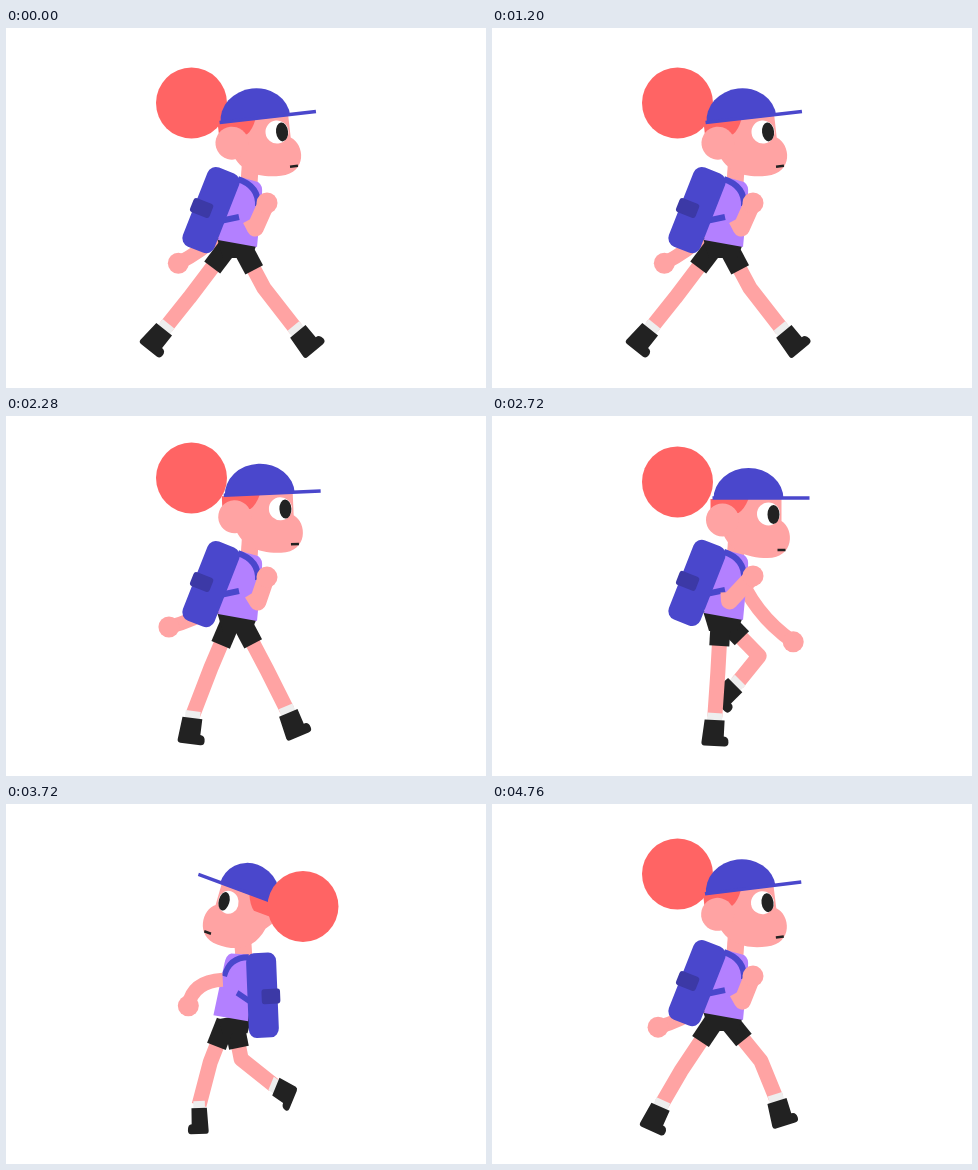
Write an HTML page with a canvas that moves like this. It is 480 px wide and 360 px high and loops after 4.8 s.

```html
<!DOCTYPE html>
<html>
<head>
<meta charset="utf-8">
<style>
html, body { margin: 0; width: 100%; height: 100%; overflow: hidden; background: #fff; }
canvas { display: block; width: 480px; height: 360px; }
</style>
</head>
<body>
<canvas id="stage" width="480" height="360"></canvas>
<script>
const c = document.getElementById('stage').getContext('2d');
const LOOP = 4800, STRIDE = 1200;
const SKIN = '#ffa3a3', RED = '#ff6464', BLUE = '#4a47cc', NAVY = '#3c39a6',
      LILAC = '#b380ff', DARK = '#222222', SOCK = '#eeeeee';

// time, knee x, knee y, ankle x, ankle y, foot angle in degrees
const LEG = [
  [0, 258, 260, 290, 301, -40],
  [110, 254, 258, 269, 301, 0],
  [320, 226, 256, 223, 301, 3],
  [480, 205, 252, 187, 299, 7],
  [560, 189, 267, 170, 300, 24],
  [600, 183, 270, 160, 299, 38],
  [720, 215, 255, 174, 281, 62],
  [920, 267, 240, 245, 267, 45],
  [1010, 272, 243, 267, 279, 8],
  [1080, 261, 254, 281, 294, -23],
  [1160, 269, 257, 284, 294, -17]
];
// time, hip y, neck offset, head tilt in degrees
const BODY = [
  [0, 216, -62, -6.5],
  [90, 217, -60, -4.5],
  [200, 208, -57, -1.5],
  [320, 201, -56, 0],
  [480, 202, -61, -2.5],
  [560, 213, -64, -7]
];
// time, hand x, hand y from the hip
const HAND = [
  [0, 172, 19], [160, 235, 48], [320, 301, 25], [460, 303, 22],
  [600, 297, 22], [780, 240, 48], [920, 187, 30], [1080, 163, 9], [1160, 166, 10]
];

const mix = (a, b, k) => a + (b - a) * k;
const rad = d => d * Math.PI / 180;
const bell = (t, mid, width) => Math.exp(-(((t - mid) / width) ** 2));
function smooth(t, a, b) {
  const k = Math.min(1, Math.max(0, (t - a) / (b - a)));
  return k * k * (3 - 2 * k);
}

// Smooth periodic curve through the keys
function sample(keys, period, time) {
  const t = ((time % period) + period) % period, n = keys.length;
  const key = j => {
    const m = (j + n) % n, [at, ...v] = keys[m];
    return { at: at + (j - m) / n * period, v };
  };
  let i = n - 1;
  while (keys[i][0] > t) i--;
  const [p, a, b, q] = [key(i - 1), key(i), key(i + 1), key(i + 2)];
  const d = b.at - a.at, u = (t - a.at) / d, w = 1 - u;
  return a.v.map((va, j) => {
    const ma = (b.v[j] - p.v[j]) / (b.at - p.at) * d;
    const mb = (q.v[j] - va) / (q.at - a.at) * d;
    return w * w * (1 + 2 * u) * va + u * w * w * ma + u * u * (3 - 2 * u) * b.v[j] - u * u * w * mb;
  });
}

function fill(path, color) { c.fillStyle = color; c.fill(new Path2D(path)); }
function stroke(path, color, width, cap = 'butt') {
  c.strokeStyle = color; c.lineWidth = width; c.lineCap = cap; c.lineJoin = 'round';
  c.stroke(new Path2D(path));
}
function oval(x, y, rx, ry, color) {
  c.fillStyle = color; c.beginPath(); c.ellipse(x, y, rx, ry, 0, 0, 7); c.fill();
}
function box(x, y, w, h, r, color) {
  c.fillStyle = color; c.beginPath(); c.roundRect(x, y, w, h, r); c.fill();
}
function group(x, y, sx, angle, draw) {
  c.save(); c.translate(x, y); c.scale(sx, 1); c.rotate(angle); draw(); c.restore();
}

function leg(time, hip, side) {
  const X = x => 226 + side * (side < 0 ? 0.9 : 1) * (x - 226);
  const [kx, ky, ax, ay, angle] = sample(LEG, STRIDE, time);
  const jx = X(229 + (ax - 225) * 0.1), jy = hip + 2;
  const dx = X(kx) - jx, dy = ky - jy, k = 27 / Math.hypot(dx, dy);
  stroke(`M${jx},${jy} L${X(kx)},${ky} L${X(ax)},${ay}`, SKIN, 15);
  group(X(ax), ay, side * (side < 0 ? 0.87 : 1), rad(angle), () => {
    box(-7.5, -4, 15, 9, 0, SOCK);
    fill('M-10,3 H10 V19 Q15,19 15,25 Q15,29 11,29 H-9 Q-12,29 -12,26 Z', DARK);
  });
  return () => stroke(`M${jx},${jy} L${jx + dx * k},${jy + dy * k}`, DARK, 20);
}

function head(x, y, side, tilt) {
  group(x, y, side, tilt, () => {
    fill('M-26,-62 H43 V-40 C56,-32 56,-3 29,-3 C8,-3 -12,-10 -18,-35 L-26,-45 Z', SKIN);
    fill('M-28,-62 H10 Q6,-52 0,-48 L-28,-48 Z', RED);
    if (side > 0) oval(-16, -41, 16.5, 16.5, SKIN);
    oval(30, -47, 11.5, 11.5, '#fff');
    oval(35, -46.5, 6, 9.5, DARK);
    stroke('M39,-11 H47', DARK, 2.5);
    fill('M-25,-62 A35,31 0 0 1 45,-62 Z', BLUE);
    stroke('M-26,-63 H71', BLUE, 3.5);
  });
}

function draw(t) {
  const side = 1 - 2 * (smooth(t, 3040, 3300) - smooth(t, 3680, 3960));
  const left = (1 - side) / 2;
  const time = t - 40 * bell(t, 4120, 250);
  const lift = bell(t, 2920, 90) + bell(t, 4120, 130);
  const [hipY, neck, tiltDeg] = sample(BODY, STRIDE / 2, time);
  const hip = hipY - 5 * lift;
  const neckX = mix(246.5, 234, left), neckY = hip + neck - 4 * left;
  const tilt = rad(mix(tiltDeg, -19, left));
  const X = x => 230 + side * (x - 230);

  const bun = () => oval(neckX + side * mix(-61, -71, left),
    neckY + mix(-79, -48, left) - 2 * lift, 35.5, 35.5, RED);

  const swingArm = () => {
    const [hx, hy] = sample(HAND, STRIDE, time);
    const x = X(mix(hx, 288, left)), y = hip + mix(hy, -17, left);
    const bendX = X(mix(mix(240, hx, 0.33), 282, left)), bendY = hip + mix(-4, -40, left);
    stroke(`M${X(245)},${hip + mix(-48, -39, left)} Q${bendX},${bendY} ${x},${y}`, SKIN, 14);
    oval(x, y, 10.5, 10.5, SKIN);
  };

  c.fillStyle = '#fff';
  c.fillRect(0, 0, 480, 360);

  if (side > 0) { bun(); swingArm(); }
  stroke(`M${neckX - 2 * side},${neckY - 20} L${neckX - 4 * side},${neckY + 8}`, SKIN, 17);
  head(neckX, neckY, side, tilt);

  const cuffs = [leg(time + 600, hip, side), leg(time, hip, side)];
  cuffs.forEach(cuff => cuff());
  group(230, hip, side, 0, () => fill('M-19,-6 L21,0 L15,14 L-13,14 Z', DARK));

  group(230 + 5 * left * side, hip, side, -0.35 * left, () => {
    fill('M4,-67 L22,-62 Q27,-59 26,-50 L21,3 L-18,-4 L-10,-50 Z', LILAC);
    stroke('M2,-65 Q23,-58 22,-38', BLUE, 6);
    stroke('M-16,-23 L3,-27', BLUE, 6);
    group(-25, -34, 1, rad(21.5), () => {
      box(-17, -42.5, 34, 85, 9, BLUE);
      box(-20, -6, 21, 15, 3, NAVY);
    });
  });

  if (side > 0) {
    const elbow = 244 - 8 * Math.cos((time - 440) / STRIDE * 2 * Math.PI);
    const shoulder = mix(elbow, 236, 0.35);
    const y = hip - 16;
    stroke(`M${X(shoulder)},${y - 9} L${X(elbow)},${y} L${X(260)},${hip - 40}`, SKIN, 17);
    oval(X(261), hip - 41, 10.5, 10.5, SKIN);
  } else {
    swingArm();
    bun();
  }
}

function frame(now) {
  draw(now % LOOP);
  requestAnimationFrame(frame);
}
requestAnimationFrame(frame);
</script>
</body>
</html>
```
